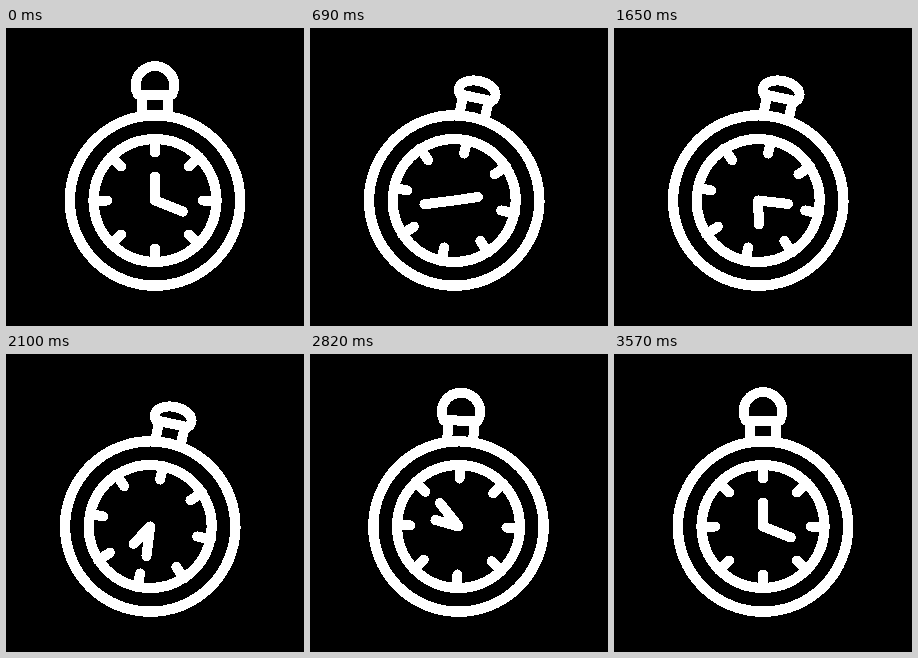
These frames come from a looping animation (298x298 px, 3.6 s). An HTML page:

```html
<!DOCTYPE html>
<html lang="en">
<head>
<meta charset="utf-8">
<title>Pocket watch</title>
<style>
  html, body { margin: 0; width: 100%; height: 100%; overflow: hidden; background: #000; }
  svg { display: block; width: 100vw; height: 100vh; }
</style>
</head>
<body>
<svg viewBox="0 0 298 298" fill="none" stroke="#fff" stroke-width="10" stroke-linecap="round" stroke-linejoin="round" shape-rendering="crispEdges">
  <g id="watch">
    <path id="crown"/>
    <circle r="85.2" stroke-width="10.4"/>
    <circle r="61.4" stroke-width="10.2"/>
    <g id="ticks"></g>
    <path id="hour" d="M0 0V-24"/>
    <path id="minute" d="M0 0V-30"/>
  </g>
</svg>
<script>
const LOOP = 3600, TURN = 3570;
const $ = id => document.getElementById(id);
const set = (id, name, value) => $(id).setAttribute(name, value);

$('ticks').innerHTML = Array.from({ length: 8 }, (_, i) =>
  `<path d="M0 -62V-48" transform="rotate(${i * 45})"/>`).join('');

// Cubic ease in and out between two times
function ease(t, from, to) {
  const p = Math.min(1, Math.max(0, (t - from) / (to - from)));
  return p < 0.5 ? 4 * p ** 3 : 1 - 4 * (1 - p) ** 3;
}

// Knob and neck; squash 0 is round, 1 is pressed flat
function crownPath(squash) {
  const base = -106 + squash;
  const half = 17 - squash;
  const rx = 19.3 - 0.7 * squash;
  const ry = 19.3 - 8 * squash;
  return `M${-half} ${base}A${rx} ${ry} 0 1 1 ${half} ${base}Z` +
    `M-13 ${base}V-86M13 ${base}V-86`;
}

function draw(t) {
  const tilt = ease(t, 0, 600) - ease(t, 2400, 3000);
  const squash = ease(t, 0, 400) - ease(t, 2400, 2960);
  const turn = Math.min(t / TURN, 1) * 360;
  set('watch', 'transform', `translate(${149 - 4.8 * tilt} 172.5) rotate(${12 * tilt})`);
  set('crown', 'd', crownPath(squash));
  set('hour', 'transform', `rotate(${turn})`);
  set('minute', 'transform', `rotate(${111.5 + 2 * turn})`);
}

const start = performance.now();
function frame() {
  draw((performance.now() - start) % LOOP);
  requestAnimationFrame(frame);
}
draw(0);
requestAnimationFrame(frame);
</script>
</body>
</html>
```
